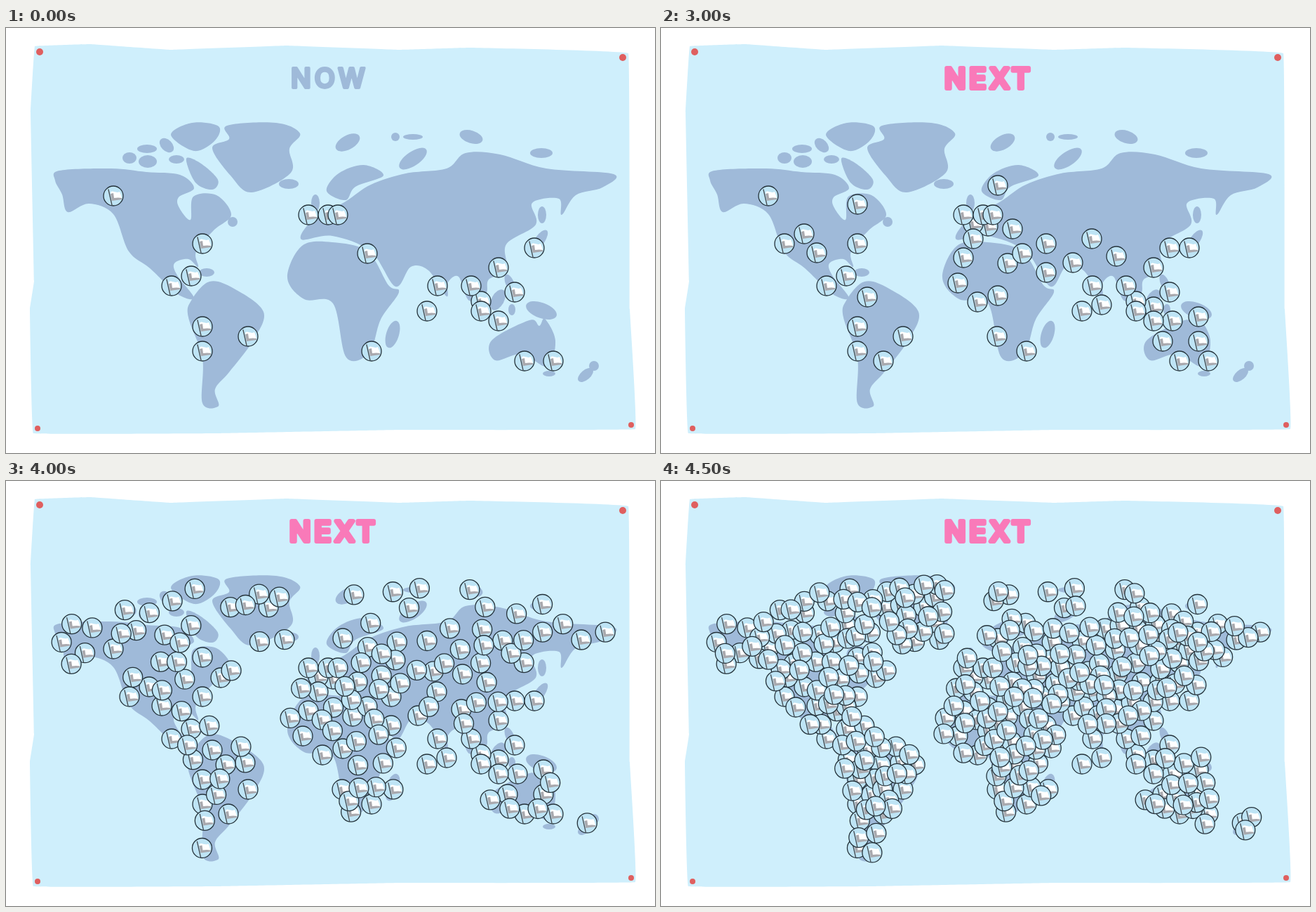
Animation, 925 px wide and 605 px high, one loop 7500 ms. Source, as an HTML page with a canvas:

```html
<!DOCTYPE html>
<html lang="en">
<head>
<meta charset="utf-8">
<title>Now and next</title>
<style>
  html, body { margin: 0; width: 100%; height: 100%; overflow: hidden; background: #fff; }
  canvas { display: block; }
</style>
</head>
<body>
<canvas width="925" height="605"></canvas>
<script>
const ctx = document.querySelector("canvas").getContext("2d");
const LOOP = 7500, NEXT_AT = 3000;
const SEA = "#cfeffc", LAND = "#9fbad9", PINK = "#f97ab9", PIN = "#df5f5f";

const parse = text => text.split(" ").map(pair => pair.split(",").map(Number));

// Closed curve through the points; a larger softness gives straighter sides.
function outline(text, softness = 6) {
  const points = parse(text), n = points.length, path = new Path2D();
  const at = i => points[(i + n) % n];
  path.moveTo(...points[0]);
  for (let i = 0; i < n; i++) {
    const [a, b, c, d] = [at(i - 1), at(i), at(i + 1), at(i + 2)];
    path.bezierCurveTo(
      b[0] + (c[0] - a[0]) / softness, b[1] + (c[1] - a[1]) / softness,
      c[0] - (d[0] - b[0]) / softness, c[1] - (d[1] - b[1]) / softness, ...c);
  }
  return path;
}

function oval(x, y, rx, ry = rx, turn = 0) {
  const path = new Path2D();
  path.ellipse(x, y, rx, ry, turn, 0, 7);
  return path;
}

const paper = outline("41,26 120,23 235,31 400,25 560,31 660,28 887,36 889,400 897,571 560,572 300,577 39,577 34,400 40,360 35,120", 100);

const lands = [];
const land = text => lands.push(outline(text));
const isle = (...shape) => lands.push(oval(...shape));

// North America
land("76,203 150,200 200,205 248,209 268,228 246,241 247,256 263,273 267,240 300,238 321,266 296,288 271,318 274,340 260,329 240,335 244,352 268,384 245,379 205,342 175,318 153,265 118,250 88,262 80,237 70,217");
land("235,152 265,135 303,140 297,161 268,175");
land("257,186 278,193 302,216 294,230 270,220");
isle(176, 185, 10, 8);
isle(201, 172, 14, 6);
isle(202, 190, 13, 9);
isle(229, 167, 12, 8, .8);
isle(243, 187, 11, 6);
isle(323, 276, 7);
isle(286, 348, 11, 6);

// Greenland and the north
land("315,139 385,135 419,150 404,172 406,206 350,234 320,210 294,171 318,158");
isle(403, 222, 14, 7);
isle(487, 163, 19, 10, -.5);
isle(555, 155, 6);
isle(580, 155, 14, 4);
isle(580, 186, 23, 10, -.6);
isle(663, 155, 17, 9, .3);
isle(763, 178, 16, 7);

// South America
land("264,388 290,361 325,371 367,404 352,445 318,490 298,514 303,538 280,534 280,470 260,412");

// Africa
land("422,310 465,305 515,318 545,366 560,376 534,415 518,462 485,469 466,392 425,386 401,355");
isle(551, 436, 9, 20, .3);

// Europe and Asia
land("457,232 474,207 510,195 538,210 498,226 484,245");
land("421,301 436,275 484,247 520,223 570,207 628,200 655,178 704,180 770,200 866,208 850,227 812,238 792,266 788,243 750,249 755,280 713,308 714,345 688,358 684,378 660,388 645,354 630,362 628,382 602,345 577,340 555,368 520,318 465,296");
isle(441, 249, 6, 12);
isle(764, 266, 6, 12);
isle(761, 302, 7, 17, .6);

// South-east Asia and Oceania
isle(718, 363, 6, 13, -.4);
isle(701, 387, 9, 16, .5);
isle(721, 401, 5, 8);
isle(763, 402, 23, 11, .35);
land("692,445 746,416 760,424 768,414 783,445 772,482 735,464 697,473");
isle(774, 492, 9, 4);
isle(826, 494, 13, 7, -.7);
isle(838, 481, 7);

let seed = 11;
const random = () => (seed = seed * 16807 % 2147483647) / 2147483647;
const onLand = (x, y) => lands.some(path => ctx.isPointInPath(path, x, y));

let flags = [];
const place = (time, text) => parse(text).map(([x, y]) => ({ time, x, y }));

// Add flags on the emptiest stretches of land.
function fill(time, count) {
  while (count--) {
    let best = { gap: -1 };
    for (let tries = 0; tries < 9;) {
      const x = 70 + random() * 795, y = 147 + random() * 385;
      if (!onLand(x, y)) continue;
      tries++;
      const gap = Math.min(...flags.map(f => Math.hypot(f.x - x, f.y - y)));
      if (gap > best.gap) best = { time, x, y, gap };
    }
    flags.push(best);
  }
}

flags = [
  ...place(2000, "466,282 494,335 451,390 628,394 702,397"),
  ...place(1000, "445,279 445,300 431,327 725,313 729,417"),
  ...place(0, "153,239 280,307 264,353 236,367 280,425 280,460 345,439 431,266 459,266 473,266 515,321 521,460 615,367 600,403 677,389 663,367 677,403 702,341 725,376 702,417 753,313 739,474 780,474"),
  ...place(3000, "280,251 204,293 176,307 222,320 480,224 501,286 549,307 549,348 587,334 614,300 649,325 423,363 480,381 294,383 317,474 479,439 766,411 766,446 715,446")
];
for (let time = 3200; time < 4000; time += 200) fill(time, 16);
for (let time = 4000; time <= 4500; time += 100) fill(time, 38);

const pole = new Path2D("M-7-9L-2 13");
const cloth = new Path2D("M-4-5C-1-9 3-3 9-6Q11-2 12 4C8 6 3 3-2 6Z");
const shade = new Path2D("M-4-3L0-4L1 3Q7 2 12 3V5Q5 6-2 7Z");
const badge = oval(0, 0, 14);

function paint(path, color) {
  ctx.fillStyle = color;
  ctx.fill(path);
}

function line(path, color) {
  ctx.strokeStyle = color;
  ctx.lineWidth = 1.3;
  ctx.stroke(path);
}

function drawFlag({ x, y }) {
  ctx.save();
  ctx.translate(x, y);
  paint(badge, "#bee4f5");
  paint(cloth, "#fff");
  paint(shade, "#a9a9ae");
  line(pole, "#454b50");
  line(badge, "#24323a");
  ctx.restore();
}

// Rounded lettering: text thickened by a round outline.
function title(text, color, size, outlineWidth, x, y) {
  ctx.font = `500 ${size}px Inter, sans-serif`;
  ctx.letterSpacing = "5px";
  ctx.fillStyle = ctx.strokeStyle = color;
  ctx.lineWidth = outlineWidth;
  ctx.strokeText(text, x, y);
  ctx.fillText(text, x, y);
}

function draw(time) {
  ctx.clearRect(0, 0, 925, 605);
  ctx.lineCap = ctx.lineJoin = "round";
  paint(paper, SEA);
  lands.forEach(path => paint(path, LAND));
  for (const [x, y] of parse("48,34 879,42 45,570 891,565"))
    paint(oval(x, y, y < 99 ? 5 : 4), PIN);
  if (time < NEXT_AT) title("NOW", LAND, 38, 4, 406, 85);
  else title("NEXT", PINK, 40, 6, 404, 86);
  flags.filter(flag => flag.time <= time).forEach(drawFlag);
}

let start;
function tick(stamp) {
  start ??= stamp;
  draw((stamp - start) % LOOP);
  requestAnimationFrame(tick);
}
requestAnimationFrame(tick);
</script>
</body>
</html>
```
